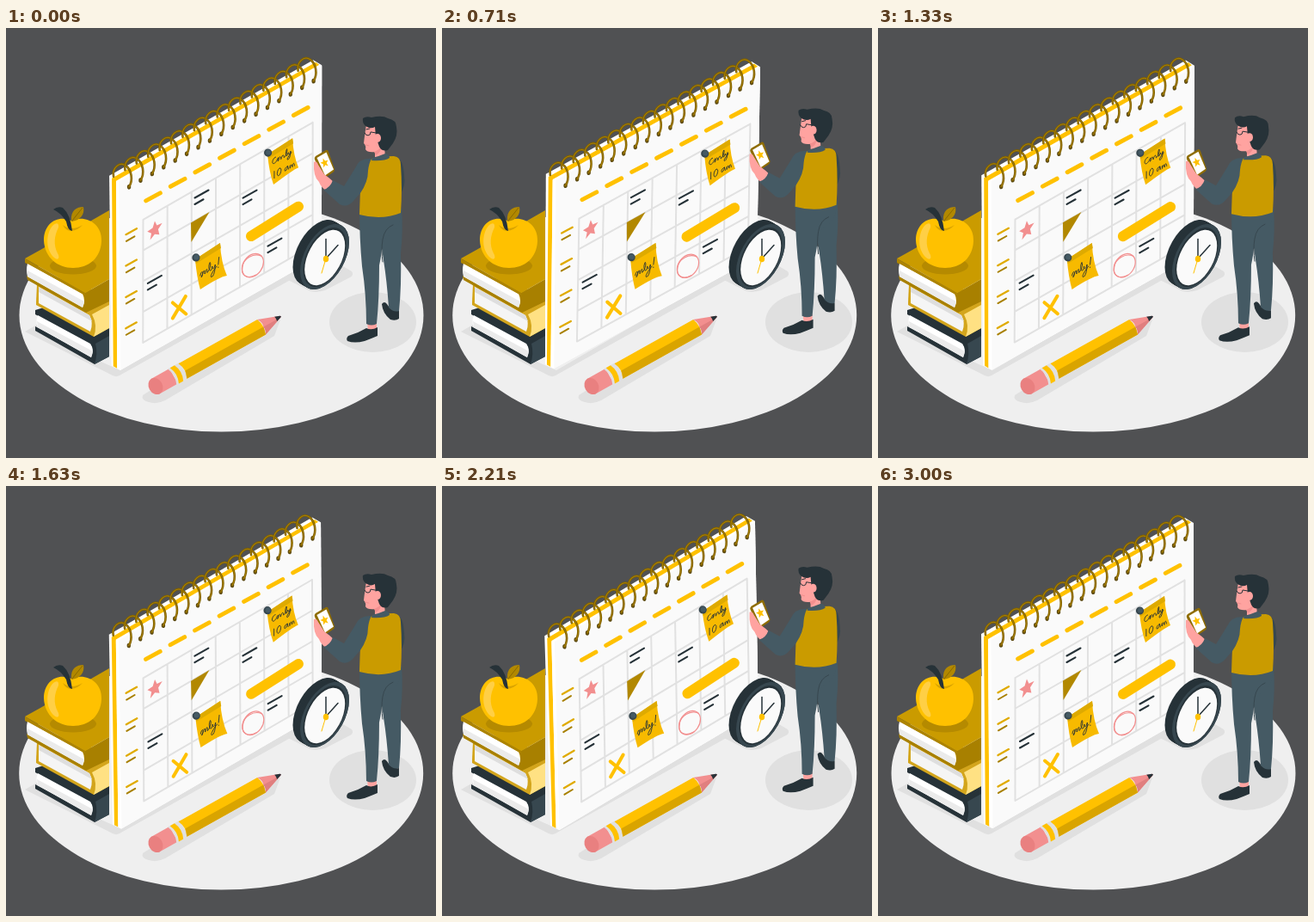
Recreate the animation shown at these times as an HTML page. Size 500 px wide and 500 px high, loop 3040 ms.

```html
<!DOCTYPE html>
<html lang="en">
<head>
<meta charset="utf-8">
<title>Calendar planning</title>
<style>
html, body { margin: 0; width: 100%; height: 100%; overflow: hidden; background: #505153; }
svg { display: block; width: 100%; height: 100%; }
.line { fill: none; stroke-linecap: round; stroke-linejoin: round; }
</style>
</head>
<body>
<svg viewBox="0 0 500 500">
  <ellipse id="floor" cx="250.5" cy="334" rx="235" ry="135.6" fill="#efefef"/>

  <g id="shadows" fill="#e0e0e0">
    <ellipse cx="426.5" cy="342" rx="50.5" ry="35"/>
    <path d="M22 353L36 345L106 386L133 398L345 275L352 281L132 404Q127 407 120 402Z"/>
    <path d="M324 291L345 279L390 276L402 283Q405 287 400 290L371 305Q362 308 354 306Z"/>
    <path d="M159 427Q157 433 166 435Q175 438 185 433L312 358L319 339L170 420Z"/>
  </g>

  <g id="books">
    <path d="M34 328L60 320L120 345V382L103 391L34 352V347L98 381Q103 374 98 368L34 333Z" fill="#263238"/>
    <path d="M37 334L98 367Q103 374 99 383L37 348Q34 341 37 334Z" fill="#fff"/>
    <path d="M36 341L101 376L99 383L37 348Z" fill="#ebebeb"/>
    <path d="M104 367L120 358V382L103 391Q107 379 104 367Z" fill="#37474f"/>

    <path d="M36 298L60 290L120 312V349L102 359L35 322V318Z" fill="#d3a51c"/>
    <path d="M38 301L97 334Q102 343 98 353L38 320Z" fill="#f5f5f5"/>
    <path d="M38 301L97 334L100 341L38 307Z" fill="#dedede"/>
    <path d="M100 333L120 322V349L102 359Q107 346 100 333Z" fill="#ffe183"/>

    <path d="M22 269L92 308L120 292V318L93 331L25 293L24 288L88 323Q93 318 90 311L22 273Z" fill="#a88000"/>
    <path d="M25 274L89 309Q93 318 89 325L25 289Q23 281 25 274Z" fill="#fff"/>
    <path d="M25 282L91 318L89 325L25 289Z" fill="#ebebeb"/>
    <path d="M22 268L40 258L120 212V292L92 308Z" fill="#ca9b00"/>
    <path d="M22 268L92 308V311L22 272Z" fill="#ad8400"/>
    <ellipse cx="78" cy="276.500" rx="27" ry="10" fill="#b58a00"/>
  </g>

  <g id="apple">
    <path d="M76 224C91 217 112 226 111 248C110 268 96 279 78 279C60 279 45 267 44 247C44 226 61 217 76 224Z" fill="#ffc100"/>
    <path d="M54 230C46 240 46 258 56 267C61 271 63 267 60 262C55 252 56 242 61 232C62 226 58 226 54 230Z" fill="#ffcf45"/>
    <path d="M66 229Q76 237 89 229Q83 236 75 236Q69 235 66 229Z" fill="#d9a400"/>
    <path d="M76 224C75 212 82 208 90 208C92 217 86 224 76 225Z" fill="#b28800"/>
    <path d="M77 224L89 209" class="line" stroke="#8b6a00" stroke-width="1"/>
    <path d="M55 211Q60 207 66 209Q75 217 77 236Q72 236 70 225Q64 215 55 211Z" fill="#263238"/>
  </g>

  <g id="calendar">
    <path d="M120 172L357 37L367 43V264L133 398L123 393Z" fill="#fff"/>
    <path d="M123 175L360 39.500L364 42.500L128 178L129.500 396L125 393.500Z" fill="#ffc100"/>
    <path d="M128 179L363 44.500L367 44V264L133 398L129.500 396Z" fill="#fff"/>
    <path d="M131.500 179L366.500 44.500L367 264L133.500 398Z" fill="#fafafa"/>
    <path id="grid" class="line" stroke="#e1e1e1" stroke-width="2"/>
    <path id="days" class="line" stroke="#ffc100" stroke-width="5"/>
    <path id="rowTop" class="line" stroke="#e0ab00" stroke-width="2.3"/>
    <path id="rowSub" class="line" stroke="#a88000" stroke-width="2"/>
    <path id="entries" class="line" stroke="#263238" stroke-width="2.1"/>
    <path id="star" fill="#f28f8f" transform="matrix(.87 -.5 0 1 173 235)"/>
    <path d="M215 226.500L236.500 214L215.500 249Z" fill="#b28800"/>
    <path d="M285 242L340 207.500" class="line" stroke="#ffc100" stroke-width="12"/>
    <path d="M194 319.500L209.500 332.500M209 312L194 337.500" class="line" stroke="#ffc100" stroke-width="4"/>
    <g class="line" stroke="#f28f8f" stroke-width="1.2">
      <ellipse cx="287" cy="276" rx="11" ry="15" transform="rotate(36 287 276)"/>
      <path d="M297 265C288 261 276 268 275 278C273 289 282 292 291 287"/>
    </g>
    <g id="notes">
      <path d="M220 269L249 250Q250 272 257 288Q249 289 226 304Q222 290 220 269Z" fill="#f7ba00"/>
      <path d="M220 269L249 250L250 256L221 274Z" fill="#deaa00"/>
      <path d="M304 147L333 128Q334 148 340 162Q333 165 311 182Q306 168 304 147Z" fill="#f7ba00"/>
      <path d="M304 147L333 128L334 134L305 152Z" fill="#deaa00"/>
      <g class="line" stroke="#263238" stroke-width=".85">
        <path transform="matrix(.87 -.5 0 1 226 288)" d="M0 0C1-5 4-4 3 0S0 3 3 0C5-5 6-4 6 1C8-5 10-4 9 1C12 1 15-6 13-9C10-6 12 1 14 1C15 1 16-2 16-3C16 2 19 1 20-3C20 4 18 10 15 9S18 2 22 0M25-9L24-1M24 2V2.500"/>
        <path transform="matrix(.87 -.5 0 1 310 158)" d="M4-6C1-7-1-3 0-1S4 1 6-2C7-5 9-3 8-1S6 1 8-2C10-5 11-3 11 0C13-5 15-4 15 0C18 0 20-5 19-8C17-6 17 0 19 0L21-3C21 1 23 0 24-3C24 2 22 6 20 5S22 1 25-1"/>
        <path transform="matrix(.87 -.5 0 1 311 173)" d="M1-6V2M8-6C4-6 4 2 7 2S12-6 8-6M19-3C15-4 14 1 16 1S19-2 19-3L20 1M22-2V1C23-4 25-3 25 1C26-4 28-3 28 1"/>
      </g>
      <g fill="#37474f"><circle cx="221" cy="267" r="4.600"/><circle cx="304.500" cy="145" r="4.600"/></g>
      <g fill="#455a64"><circle cx="221.500" cy="266.500" r="3"/><circle cx="305" cy="144.500" r="3"/></g>
    </g>
    <g id="rings" class="line"></g>
  </g>

  <g id="clock">
    <g id="clockSide" fill="#263238"></g>
    <circle r="1" fill="#37474f" transform="matrix(28.500 -17 0 34 370.500 266)"/>
    <circle r="1" fill="#263238" transform="matrix(25 -15 0 31 370.500 266.500)"/>
    <circle r="1" fill="#fafafa" transform="matrix(23.500 -14 0 29 370.700 267)"/>
    <g class="line">
      <path d="M372 268V245.500" stroke="#263238" stroke-width="1.500"/>
      <path d="M372 268L386 252.500" stroke="#263238" stroke-width="1.500"/>
      <path d="M372 268L367 285" stroke="#ffc100" stroke-width="1"/>
    </g>
    <ellipse cx="372" cy="268.500" rx="3.200" ry="3.800" fill="#ffc100"/>
  </g>

  <g id="pencil" transform="translate(174 416.500) rotate(-29.200)">
    <path d="M-1-10H24V10H-1Z" fill="#f28f8f"/>
    <ellipse cx="0" rx="8" ry="10" fill="#e98080"/>
    <path d="M22-10.500H38V10.500H22Q27 0 22-10.500Z" fill="#e0e0e0"/>
    <path d="M25-10.500H31Q36 0 31 10.500H25Q30 0 25-10.500Z" fill="#ffc100"/>
    <path d="M36-10H141Q145 0 141 10H36Q41 0 36-10Z" fill="#ffc100"/>
    <path d="M39 1H143L141 10H36Q38 5 39 1Z" fill="#d9a400"/>
    <path d="M141-10L166-1Q168 0 166 1L141 10Q145 5 143 1Q145-4 141-10Z" fill="#f28f8f"/>
    <path d="M143 1H166L141 10Q144 5 143 1Z" fill="#e07f7f"/>
    <path d="M160-3L166-1Q168 0 166 1L160 3Q161 0 160-3Z" fill="#263238"/>
  </g>

  <g id="person">
    <path d="M420 342H431V350L421 352ZM446 324L456 329V334L447 333Z" fill="#ffa3a0"/>
    <path d="M437 321Q440 317 443 321Q448 330 457 329V338Q453 341 447 339Q438 332 437 321Z" fill="#263238"/>
    <path d="M432 348V358Q425 361 417 364Q405 367 397 364Q395 361 398 358Q409 355 419 349Q425 352 432 348Z" fill="#263238"/>
    <path d="M435 215L460 210Q462 235 459 262Q460 300 457 329Q451 331 445 325Q443 295 439 270L434 235Z" fill="#455a64"/>
    <path d="M411 210L460 212L459 218Q458 236 438 246Q437 263 434 276Q434 315 431 344Q425 347 419 344Q419 310 414 277Q411 245 411 210Z" fill="#455a64"/>
    <path d="M438 272Q436 258 438 246Q440 233 450 229" class="line" stroke="#37474f" stroke-width="1"/>
    <path d="M454 151Q462 152 463 172Q465 184 458 194Z" fill="#37474f"/>
    <path d="M420 154Q435 149 451 149Q459 150 459 159Q461 187 459 215Q437 224 411 217Q412 185 413 166Q413 157 420 154Z" fill="#ca9b00"/>

    <path d="M360 149L372 142Q374 141 375 144L382 164Q382 167 380 168L371 174Q369 175 368 172L359 153Q358 151 360 149Z" fill="#8f6d00"/>
    <path d="M361.500 151L372.500 144.500L381 164.500L371 171.500Z" fill="#fff"/>
    <path id="phoneStar" fill="#ffc100" transform="matrix(.85 -.3 .35 1 370.500 157)"/>
    <path d="M358 156Q361 154 363 159L370 170Q377 175 382 180L374 191Q366 185 364 179Q357 173 358 156Z" fill="#ffa3a0"/>
    <path d="M425 152Q411 151 406 163L393 184L380 177Q377 186 369 188L388 205Q397 210 405 200L412 192Q421 179 421 166Q422 157 425 152Z" fill="#455a64"/>

    <path d="M419 112Q428 108 438 116L441 150Q434 153 429 150V144Q420 145 418 141Q419 137 416 134Q417 125 419 112Z" fill="#ffa3a0"/>
    <path d="M428 144Q434 142 437 137Q436 145 430 148Z" fill="#f28f8f"/>
    <path d="M426 151Q434 149 441 146Q446 147 446 151Q440 155 425 154Z" fill="#455a64"/>
    <path d="M415 105Q419 102 425 104Q438 101 444 105Q454 107 454 115Q456 125 450 134L444 142Q437 144 434 138L430 126L429 115Q424 118 418 114Q414 110 415 105Z" fill="#263238"/>
    <ellipse cx="432" cy="128" rx="4" ry="5" fill="#ffa3a0"/>
    <path d="M417 122Q418 125 421 125Q424 125 424 121L430 122M419 118L423 117" class="line" stroke="#263238" stroke-width="1"/>
    <path d="M418 136L422 137" class="line" stroke="#f28f8f" stroke-width="1"/>
  </g>
</svg>
<script>
const LOOP = 3040;
const LEAD = 40;
const byId = id => document.getElementById(id);
const setPath = (id, d) => byId(id).setAttribute('d', d);
const range = (count, fn) => Array.from({ length: count }, (_, i) => fn(i)).join('');
const segment = (x, y, dx, dy) => `M${x} ${y}l${dx} ${dy}`;

function starPath(outer, inner) {
  return 'M' + range(10, i => {
    const radius = i % 2 ? inner : outer;
    const angle = i * Math.PI / 5 - Math.PI / 2;
    return `${i ? 'L' : ''}${radius * Math.cos(angle)} ${radius * Math.sin(angle)}`;
  }) + 'Z';
}

function ring(i) {
  const x = 143 + i * 13.4;
  const y = 185 - i * 7.72;
  const coil = `M${x - 18} ${y - 12}c-2-10 7-18 14-13c7 5 9 17 4 25`;
  return `<ellipse cx="${x}" cy="${y}" rx="2.2" ry="2.8" fill="#5c4a12"/>
    <path d="${coil}" stroke="#7d5f00" stroke-width="2.6"/>
    <path d="${coil}" stroke="#a88000" stroke-width="1"/>`;
}

setPath('grid',
  range(8, i => segment(159.5 + i * 28.15, 223 - i * 16.2, 0, 143)) +
  range(5, i => segment(159.5, 223 + i * 35.75, 197, -113.4)));
setPath('days', range(7, i => segment(162.7 + i * 28.6, 201 - i * 16.6, 16.6, -9)));
setPath('rowTop', range(4, i => segment(139.5, 240.3 + i * 36.4, 12.5, -7)));
setPath('rowSub', range(4, i => segment(140, 248 + i * 36.3, 9.5, -5.5)));
setPath('entries', [[219.5, 197.5], [275.5, 197.5], [165, 297], [304.5, 253.5]]
  .map(([x, y]) => segment(x, y, 16, -9) + segment(x, y + 7.5, 10, -5.7)).join(''));
setPath('star', starPath(10.5, 4.8));
setPath('phoneStar', starPath(5.5, 2.4));
byId('rings').innerHTML = range(17, ring);
byId('clockSide').innerHTML = range(8, i =>
  `<circle r="1" transform="matrix(28.5 -17 0 34 ${362 + i * 1.2} ${261 + i * 0.7})"/>`);

function render(time) {
  const phase = 2 * Math.PI * ((time + LEAD) % LOOP) / LOOP;
  const lift = (1 - Math.cos(2 * phase)) / 2;
  byId('floor').setAttribute('transform', `translate(${-3.3 * lift})`);
  byId('person').setAttribute('transform', `translate(${-0.4 * lift} ${-9.3 * lift})`);
  byId('calendar').setAttribute('transform', `rotate(${Math.sin(phase)} 243 217)`);
}

const start = performance.now();
function tick() {
  render(performance.now() - start);
  requestAnimationFrame(tick);
}
tick();
</script>
</body>
</html>
```
